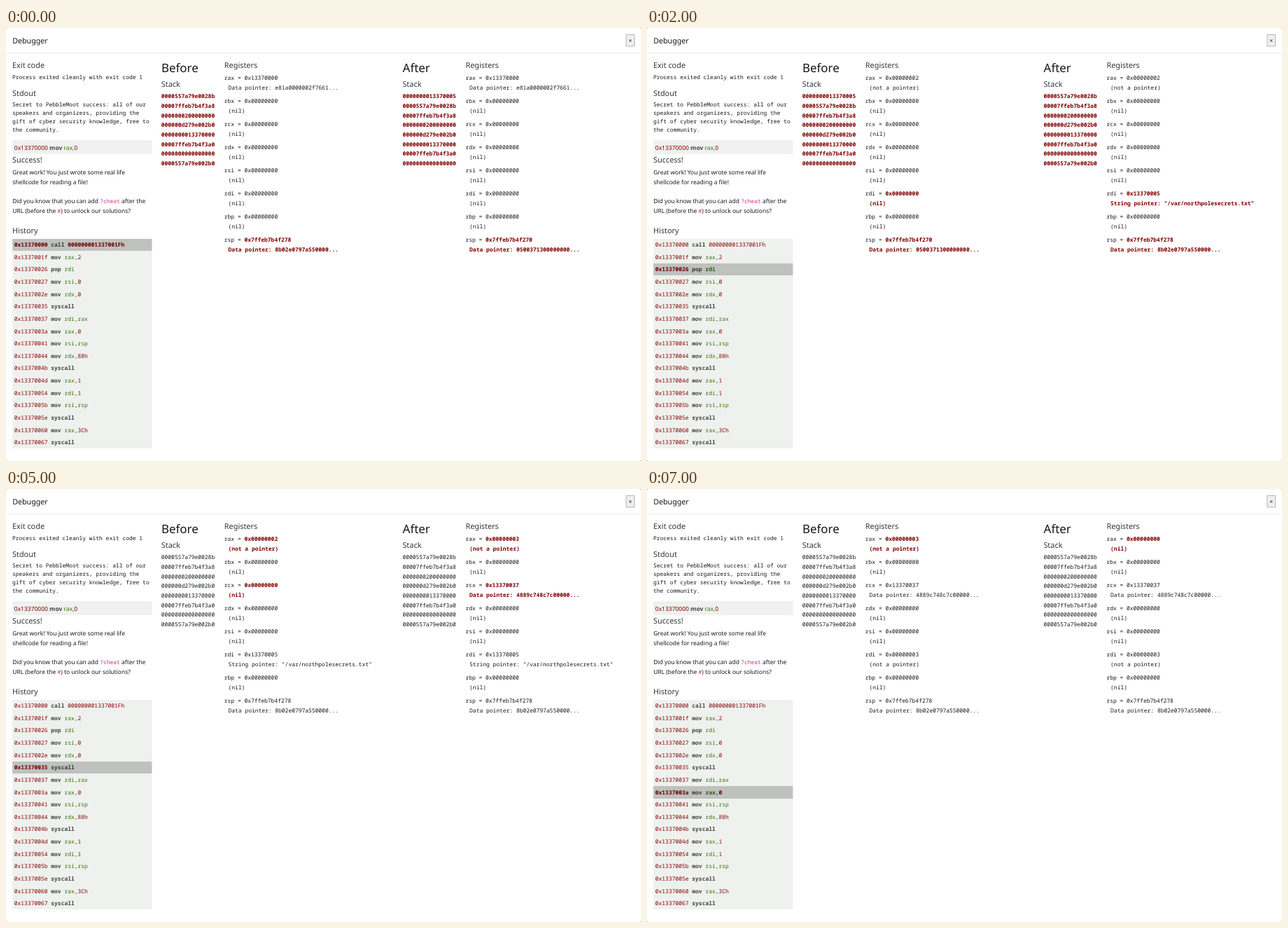
Recreate the animation shown at these times as an HTML page. Size 907 by 618 pixels, loop 8 s.

```html
<!DOCTYPE html>
<html lang="en">
<head>
<meta charset="utf-8">
<title>Debugger</title>
<style>
  html, body { margin: 0; width: 100%; height: 100%; overflow: hidden; background: #888; }
  svg { display: block; width: 907px; height: 618px; }
  text { white-space: pre; fill: #15181b; text-rendering: geometricPrecision; }
  .body { font: 8.48px "Noto Sans", sans-serif; }
  .head { font: 10.9px "Noto Sans", sans-serif; fill: #33373b; }
  .title { font: 10.7px "Noto Sans", sans-serif; }
  .big { font: 16.9px "Noto Sans", sans-serif; }
  .mono { font: 7.96px "Noto Sans Mono", monospace; }
  .hot { font-weight: bold; fill: #800000; }
  .code { fill: #444; }
  .num { fill: #880000; }
  .key { fill: #444; font-weight: 600; }
  .reg { fill: #397300; }
  .tag { font: 7.96px "Noto Sans Mono", monospace; fill: #d02c8c; }
  .on { font-weight: bold; }
</style>
</head>
<body>
<svg id="stage" viewBox="0 0 907 618" xmlns="http://www.w3.org/2000/svg"></svg>
<script>
const NS = 'http://www.w3.org/2000/svg';
const stage = document.getElementById('stage');
const STEP = 1000, STEPS = 8;
const ROW_Y = 300.6, ROW_H = 17.62, AFTER_DX = 344.6;

function add(parent, name, attrs, content) {
  const el = document.createElementNS(NS, name);
  for (const k in attrs) el.setAttribute(k, attrs[k]);
  if (content) el.textContent = content;
  parent.appendChild(el);
  return el;
}
const box = (x, y, width, height, fill, more) =>
  add(stage, 'rect', { x, y, width, height, fill, ...more });
const text = (x, y, cls, content) => add(stage, 'text', { x, y, class: cls }, content);
const rowTop = i => Math.round(ROW_Y + ROW_H * i);

// parts: strings, or [class, string] pairs
function rich(x, y, cls, parts) {
  const el = text(x, y, cls);
  for (const p of parts) {
    const [c, s] = Array.isArray(p) ? p : ['', p];
    add(el, 'tspan', c ? { class: c } : {}, s);
  }
  return el;
}

function asm(line) {
  return line.split(/([ ,])/).map(w =>
    /^\d/.test(w) ? ['num', w] :
    /^r[a-z]{2}$/.test(w) ? ['reg', w] :
    /^[a-z]+$/.test(w) ? ['key', w] : w);
}

// Window
box(0, 0, 907, 618, '#fff', { rx: 2 });
box(0, 35.4, 907, 0.8, '#dfe2e5');
text(9.2, 22.3, 'title', 'Debugger');
box(885.9, 9.6, 11.6, 16.4, '#efefef', { stroke: '#a6a6a6', 'stroke-width': 0.8 });
add(stage, 'text', { x: 891.7, y: 21.4, class: 'body', 'text-anchor': 'middle' }, '×');

// Left column
text(9, 57, 'head', 'Exit code');
text(9, 73, 'mono', 'Process exited cleanly with exit code 1');
text(9, 97, 'head', 'Stdout');
['Secret to PebbleMoot success: all of our',
 'speakers and organizers, providing the',
 'gift of cyber security knowledge, free to',
 'the community.'].forEach((s, i) => text(9, 112.4 + 11.9 * i, 'mono', s));

box(9.2, 160.2, 199.2, 19.8, '#eef1ee');
rich(11.8, 173.9, 'body code', asm('0x13370000 mov rax,0'));
text(9, 192, 'head', 'Success!');
text(9.2, 209, 'body', 'Great work! You just wrote some real life');
text(9.2, 222.6, 'body', 'shellcode for reading a file!');
rich(9.2, 249.9, 'body', ['Did you know that you can add ', ['tag', '?cheat'], ' after the']);
rich(9.2, 263.5, 'body', ['URL (before the ', ['tag', '#'], ') to unlock our solutions?']);

text(9, 293.4, 'head', 'History');
const program = `00 call 000000001337001Fh
1f mov rax,2
26 pop rdi
27 mov rsi,0
2e mov rdx,0
35 syscall
37 mov rdi,rax
3a mov rax,0
41 mov rsi,rsp
44 mov rdx,88h
4b syscall
4d mov rax,1
54 mov rdi,1
5b mov rsi,rsp
5e syscall
60 mov rax,3Ch
67 syscall`.split('\n');
box(9.2, rowTop(0), 199.2, rowTop(program.length) - rowTop(0), '#eef1ee');
const rows = program.map((s, i) =>
  rich(11.8, ROW_Y + 11.6 + ROW_H * i, 'mono code', asm('0x133700' + s)));
const shade = box(9.2, 0, 199.2, 0, '#000', { 'fill-opacity': 0.2 });

// Machine state
const names = ['rax', 'rbx', 'rcx', 'rdx', 'rsi', 'rdi', 'rbp', 'rsp'];
const words = ['0000000013370005', '0000557a79e0028b', '00007ffeb7b4f3a8', '0000000200000000',
  '000000d279e002b0', '0000000013370000', '00007ffeb7b4f3a0', '0000000000000000', '0000557a79e002b0'];
const notes = {
  '00000000': '(nil)',
  '13370000': 'Data pointer: e81a0000002f7661...',
  '13370005': 'String pointer: "/var/northpolesecrets.txt"',
  '13370037': 'Data pointer: 4889c748c7c00000...',
  '7ffeb7b4f270': 'Data pointer: 0500371300000000...',
  '7ffeb7b4f278': 'Data pointer: 8b02e0797a550000...'
};
const stackOf = s => words.slice(s.rsp.endsWith('8') ? 1 : 0).slice(0, 8);

const states = [{ rsp: '7ffeb7b4f278' }];
names.slice(0, 7).forEach(n => states[0][n] = '00000000');
states[0].rax = '13370000';
[{ rsp: '7ffeb7b4f270' },
 { rax: '00000002' },
 { rdi: '13370005', rsp: '7ffeb7b4f278' },
 {}, {},
 { rax: '00000003', rcx: '13370037' },
 { rdi: '00000003' },
 { rax: '00000000' }].forEach((change, i) => states.push({ ...states[i], ...change }));

function panel(title, dx) {
  text(222 + dx, 63.4, 'big', title);
  text(221.8 + dx, 83.7, 'head', 'Stack');
  text(311.8 + dx, 57, 'head', 'Registers');
  const stack = words.slice(1).map((_, i) => text(221.8 + dx, 100.3 + 13.64 * i, 'mono'));
  const regs = names.map((n, i) => {
    const y = 73.8 + 32.98 * i;
    const line = rich(311.8 + dx, y, 'mono', [n + ' = ', '']);
    return { value: line.lastChild, note: text(317.5 + dx, y + 14, 'mono') };
  });
  return { stack, regs };
}
const before = panel('Before', 0), after = panel('After', AFTER_DX);

function fill(p, state, other) {
  const mine = stackOf(state), theirs = stackOf(other);
  p.stack.forEach((el, i) => {
    el.textContent = mine[i];
    el.classList.toggle('hot', mine[i] !== theirs[i]);
  });
  p.regs.forEach(({ value, note }, i) => {
    const v = state[names[i]], hot = v !== other[names[i]];
    value.textContent = '0x' + v;
    note.textContent = notes[v] || '(not a pointer)';
    value.classList.toggle('hot', hot);
    note.classList.toggle('hot', hot);
  });
}

function show(step) {
  shade.setAttribute('y', rowTop(step));
  shade.setAttribute('height', rowTop(step + 1) - rowTop(step));
  rows.forEach((row, i) => row.classList.toggle('on', i === step));
  fill(before, states[step], states[step + 1]);
  fill(after, states[step + 1], states[step]);
}

let shown = -1;
const start = performance.now();
function tick() {
  const step = Math.floor((performance.now() - start) / STEP) % STEPS;
  if (step !== shown) show(shown = step);
  requestAnimationFrame(tick);
}
tick();
</script>
</body>
</html>
```
